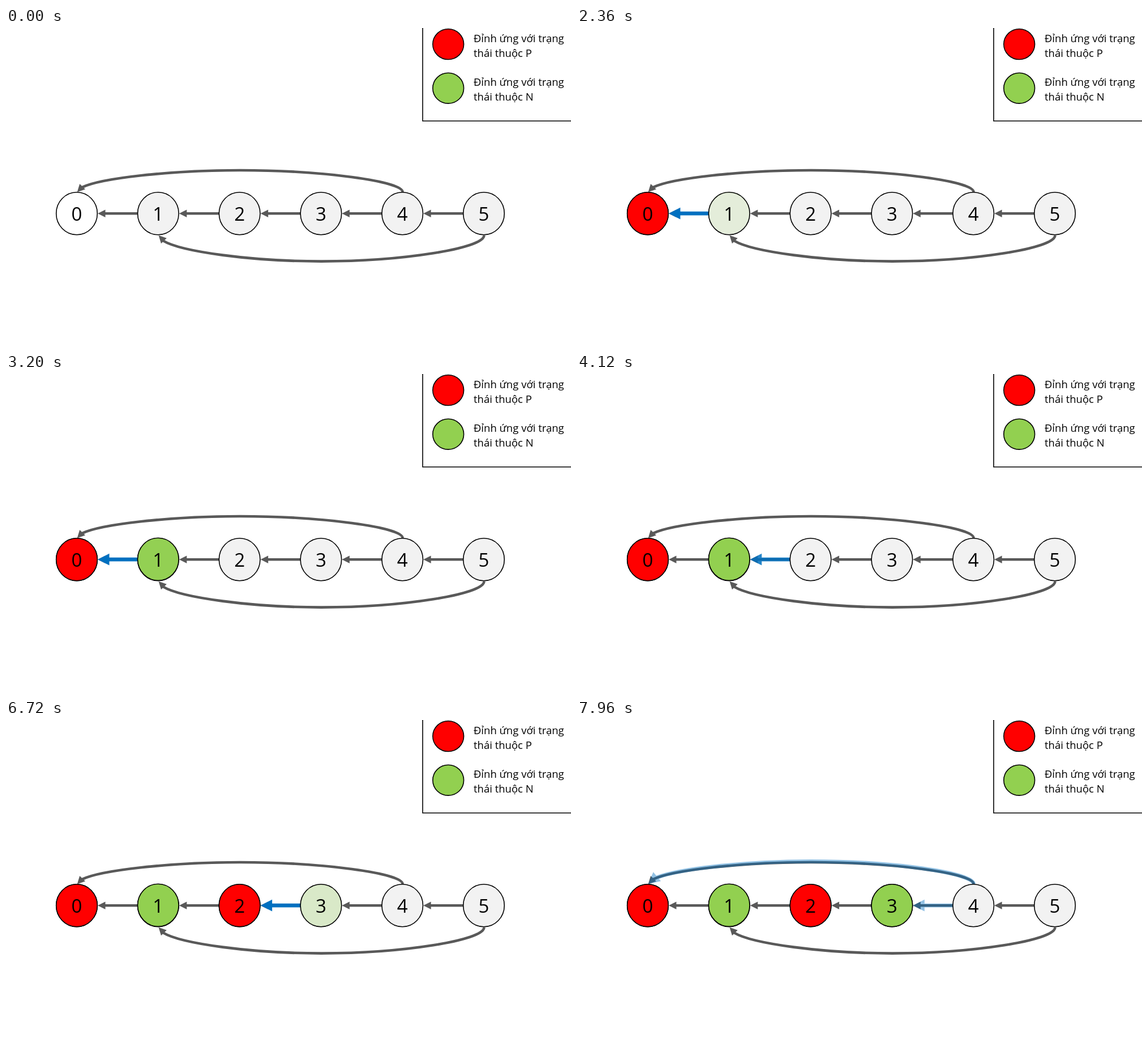
Recreate the animation shown at these times as an HTML page. Size 998 by 561 pixels, loop 8 s.

```html
<!DOCTYPE html>
<html lang="vi">
<head>
<meta charset="utf-8">
<style>
  html, body { margin: 0; width: 100%; height: 100%; overflow: hidden; background: #fff; }
  svg { display: block; width: 998px; height: 561px; }
  text { font-family: "Open Sans", "Noto Sans", sans-serif; }
</style>
</head>
<body>
<svg id="stage" viewBox="0 0 998 561"></svg>
<script>
const LOOP = 8000, FRAME = 40, FADE = 1000;
const RED = '#ff0000', GREEN = '#92d050', BLUE = '#0070c0', GRAY = '#595959';
const stage = document.getElementById('stage');
const nodeX = i => 125 + 143.8 * i;
const NODE_Y = 327.2;

function add(tag, attrs, parent = stage) {
  const el = document.createElementNS('http://www.w3.org/2000/svg', tag);
  for (const key in attrs) el.setAttribute(key, attrs[key]);
  parent.append(el);
  return el;
}

function label(text, x, y, size, anchor = 'start') {
  add('text', { x, y, 'font-size': size, 'text-anchor': anchor }).textContent = text;
}

function disc(cx, cy, rx, ry, fill) {
  return add('ellipse', { cx, cy, rx, ry, fill, stroke: '#000', 'stroke-width': 1.6 });
}

const grayStyle = { color: GRAY, width: 4.6, length: 13.5, half: 6.8 };
const blueStyle = { color: BLUE, width: 6.8, length: 20.5, half: 10.4 };

// Arrowhead whose axis points from its base towards the tip at the given angle.
function head(x, y, angle, { color, length, half }, parent) {
  add('path', {
    d: `M0 0L${-length} ${-half}V${half}Z`, fill: color,
    transform: `translate(${x} ${y}) rotate(${angle})`
  }, parent);
}

function straightArrow(to, style) {
  const group = add('g', {});
  const tip = nodeX(to) + 37;
  add('path', {
    d: `M${nodeX(to + 1) - 36} ${NODE_Y}H${tip + style.length - 1}`,
    stroke: style.color, 'stroke-width': style.width
  }, group);
  head(tip, NODE_Y, 180, style, group);
  return group;
}

function curvedArrow(from, to, edgeY, peakY, angle, style) {
  const group = add('g', {});
  const x1 = nodeX(from) + .5, x2 = nodeX(to) + .7;
  const mid = (x1 + x2) / 2, bendY = (edgeY + peakY) / 2;
  add('path', {
    d: `M${x1} ${edgeY}C${x1} ${bendY} ${(x1 + mid) / 2} ${peakY} ${mid} ${peakY}` +
       `S${x2} ${bendY} ${x2} ${edgeY}`,
    fill: 'none', stroke: style.color, 'stroke-width': style.width,
    pathLength: 100, 'stroke-dasharray': `${100 - style.length * .16} 100`
  }, group);
  head(x2, edgeY, angle, style, group);
  return group;
}

// Legend
add('path', { d: 'M736 -2V164H1000', fill: 'none', stroke: '#000', 'stroke-width': 1.6 });
[['P', RED, 28.6], ['N', GREEN, 106.2]].forEach(([name, color, y]) => {
  disc(781.2, y, 27.4, 26.9, color);
  label('Đỉnh ứng với trạng', 826, y - 3.8, 18.5);
  label('thái thuộc ' + name, 826, y + 22, 18.5);
});

// Graph
for (let i = 0; i < 5; i++) straightArrow(i, grayStyle);
curvedArrow(4, 0, 289.4, 251, 134, grayStyle);
curvedArrow(5, 1, 365.8, 411.6, 226, grayStyle);

const fades = [];
const fade = (el, start, end = Infinity) => fades.push({ el, start, end });

fade(straightArrow(0, blueStyle), 1060, 3240);
fade(straightArrow(1, blueStyle), 3260, 5320);
fade(straightArrow(2, blueStyle), 5400, 7480);
fade(straightArrow(3, blueStyle), 7540);
fade(curvedArrow(4, 0, 289.4, 249.3, 140, blueStyle), 7540);

const nodeStart = [0, 2220, 4290, 6470];
for (let i = 0; i < 6; i++) {
  disc(nodeX(i), NODE_Y, 36.3, 37.5, i ? '#f2f2f2' : '#fff');
  if (i in nodeStart) {
    const y = NODE_Y - (i === 1 ? .5 : 0);
    fade(disc(nodeX(i), y, 36.3, 37.5, i % 2 ? GREEN : RED), nodeStart[i]);
  }
  label(i, nodeX(i), 339.8, 33, 'middle');
}

function draw(now) {
  const t = Math.floor(now % LOOP / FRAME) * FRAME;
  for (const { el, start, end } of fades) {
    const shown = t < end ? (t - start) / FADE : 0;
    el.setAttribute('opacity', Math.max(0, Math.min(1, shown)));
  }
}

const begin = performance.now();
function tick() {
  draw(performance.now() - begin);
  requestAnimationFrame(tick);
}
tick();
</script>
</body>
</html>
```
